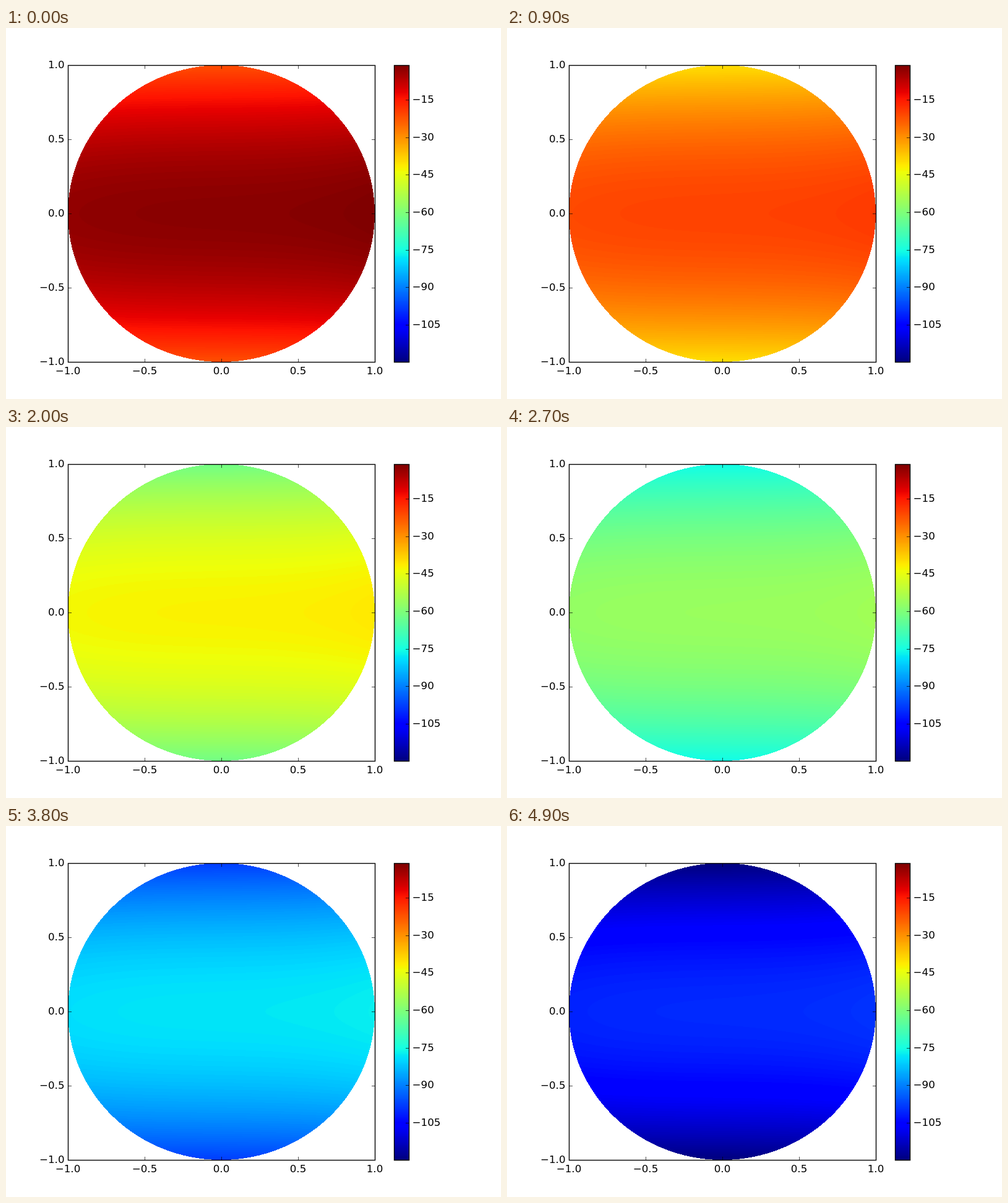
Recreate the animation shown at these times as an HTML page with a canvas. Size 800 by 600 pixels, loop 5 s.

```html
<!DOCTYPE html>
<html lang="en">
<head>
<meta charset="utf-8">
<title>Field decay on a disc</title>
<style>
html, body { margin: 0; width: 100%; height: 100%; overflow: hidden; background: #fff; }
canvas { display: block; }
</style>
</head>
<body>
<canvas id="plot" width="800" height="600"></canvas>
<script>
const ctx = document.getElementById('plot').getContext('2d');
const LEFT = 100, TOP = 60, W = 496, H = 480;
const BAR_X = 627, BAR_W = 24;
const V_MAX = -1.1, V_MIN = -119.9;
const STEPS = 50, STEP_MS = 100;

// Piecewise linear ramp through [position, value] points
function ramp(points, u) {
  for (let i = 1; i < points.length; i++) {
    const [a, p] = points[i - 1], [b, q] = points[i];
    if (u <= b) return p + (q - p) * (u - a) / (b - a);
  }
  return points[points.length - 1][1];
}

// Jet colour map in 256 levels
const RED = [[0, 0], [.35, 0], [.66, 1], [.89, 1], [1, .5]];
const GREEN = [[0, 0], [.125, 0], [.375, 1], [.64, 1], [.91, 0], [1, 0]];
const BLUE = [[0, .5], [.11, 1], [.34, 1], [.65, 0], [1, 0]];
const jet = Array.from({ length: 256 }, (_, i) =>
  [RED, GREEN, BLUE].map(c => Math.round(255 * ramp(c, i / 255))));

function colour(v) {
  const level = Math.floor((v - V_MIN) / (V_MAX - V_MIN) * 256);
  return jet[Math.max(0, Math.min(255, level))];
}

// Starting field on the unit disc; NaN outside
const field = new Float32Array(W * H);
for (let j = 0; j < H; j++) {
  const y = (j + .5 - H / 2) / (H / 2);
  for (let i = 0; i < W; i++) {
    const x = (i + .5 - W / 2) / (W / 2);
    field[j * W + i] = x * x + y * y > 1 ? NaN
      : -2.25 + .3 * x + .15 * x * x + .7 * x ** 3 - 19.65 * y * y;
  }
}

const image = ctx.createImageData(W, H);
function drawField(step) {
  const data = image.data;
  data.fill(255);
  field.forEach((v, k) => {
    if (!isNaN(v)) data.set(colour(v - 2 * step), 4 * k);
  });
  ctx.putImageData(image, LEFT, TOP);
}

function drawBar() {
  for (let j = 0; j < H; j++) {
    const v = V_MAX + (V_MIN - V_MAX) * (j + .5) / H;
    ctx.fillStyle = `rgb(${colour(v)})`;
    ctx.fillRect(BAR_X, TOP + j, BAR_W, 1);
  }
}

function tick(x, y, dx, dy) {
  ctx.beginPath();
  ctx.moveTo(x + .5, y + .5);
  ctx.lineTo(x + .5 + dx, y + .5 + dy);
  ctx.stroke();
}

function label(text, x, y, align) {
  ctx.textAlign = align;
  ctx.fillText(text.replace('-', '\u2212'), x, y);
}

function drawAxes() {
  const len = 5.56;
  ctx.fillStyle = ctx.strokeStyle = '#000';
  ctx.font = '16.67px "DejaVu Sans", sans-serif';
  ctx.lineWidth = 1.39;
  ctx.strokeRect(LEFT + .5, TOP + .5, W, H);
  ctx.strokeRect(BAR_X + .5, TOP + .5, BAR_W, H);
  ctx.lineWidth = .69;
  for (let k = 0; k < 5; k++) {
    const x = LEFT + k * W / 4, y = TOP + k * H / 4;
    tick(x, TOP, 0, len);
    tick(x, TOP + H, 0, -len);
    tick(LEFT, y, len, 0);
    tick(LEFT + W, y, -len, 0);
    label((k / 2 - 1).toFixed(1), x, 560, 'center');
    label((1 - k / 2).toFixed(1), 94.5, y + 5, 'right');
  }
  for (let v = -15; v >= -105; v -= 15) {
    const y = Math.round(TOP + H * (v - V_MAX) / (V_MIN - V_MAX));
    tick(BAR_X + BAR_W, y, -len, 0);
    label(String(v), 656.6, y + 5, 'left');
  }
}

let shown = -1;
function render(now) {
  const step = Math.floor(now / STEP_MS) % STEPS;
  if (step !== shown) {
    shown = step;
    ctx.fillStyle = '#fff';
    ctx.fillRect(0, 0, 800, 600);
    drawField(step);
    drawBar();
    drawAxes();
  }
}

const start = performance.now();
function loop() {
  render(performance.now() - start);
  requestAnimationFrame(loop);
}
loop();
</script>
</body>
</html>
```
